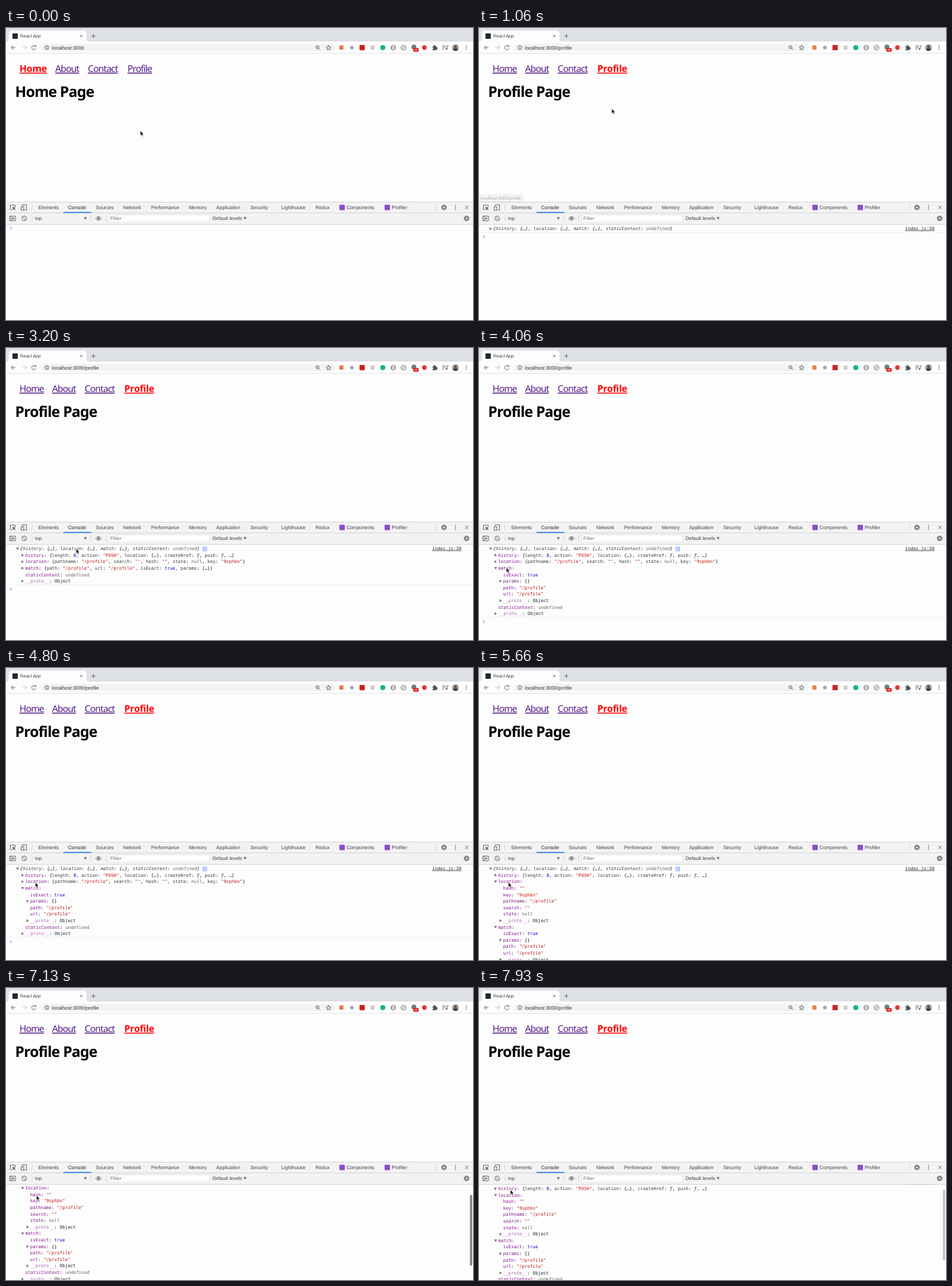
Animation of 692x432 px, one loop 8000 ms. Source, as an HTML page:

```html
<!DOCTYPE html>
<html lang="en">
<head>
<meta charset="utf-8">
<title>Router props in the console</title>
<style>
  html, body { margin: 0; width: 100%; height: 100%; overflow: hidden; background: #fdfdfd; }
  svg { display: block; width: 100vw; height: 100vh; }
  text { white-space: pre; text-rendering: geometricPrecision; fill: #3c4043; }
  .ui { font: 7.3px "Liberation Sans", Arial, sans-serif; }
  .tab { font: 6.6px "Liberation Sans", Arial, sans-serif; }
  .url { font: 7.4px "Liberation Sans", Arial, sans-serif; fill: #303134; }
  .tip { font: 6.4px "Liberation Sans", Arial, sans-serif; fill: #5f6368; }
  .mono { font: 6.6px "DejaVu Sans Mono", monospace; fill: #20242a; }
  .it { font-style: italic; }
  .link { font: 13.8px "Noto Sans", sans-serif; letter-spacing: -.8px; fill: #551a8b; text-decoration: underline; }
  .active { font-weight: 700; font-size: 14px; letter-spacing: -.22px; fill: #f00; }
  .head { font: 700 21.8px "Noto Sans", sans-serif; letter-spacing: -.75px; fill: #000; }
  .key { fill: #881391; } .proto { fill: #b061b8; } .sub { fill: #3c3c3c; }
  .str { fill: #c41a16; } .num { fill: #1c00cf; } .nil { fill: #666; }
  .icon { fill: none; stroke: #5f6368; stroke-width: .9; }
</style>
</head>
<body>
<svg viewBox="0 0 692 432" preserveAspectRatio="none">
  <rect width="692" height="432" fill="#fdfdfd"/>
  <g id="console"></g>
  <rect id="thumb" x="687.5" width="3.2" height="105" rx="1.6" fill="#555"/>
  <g id="frame"></g>
  <g id="page"></g>
  <g id="status">
    <path d="M0 247H63.500Q65.500 247 65.500 249V257H0Z" fill="#eef0f1" stroke="#ccc" stroke-width=".7"/>
    <text class="tip" x="2" y="254.200">localhost:3000/profile</text>
  </g>
  <path id="mouse" d="M0 0V7.200L1.700 5.700L2.900 8.500L4.200 7.900L3 5.200H5.200Z" fill="#000" stroke="#fff" stroke-width=".6"/>
</svg>
<script>
const LOOP = 8000, NAVIGATE = 930, EXPAND = 2660, OPEN_MATCH = 4060, OPEN_LOCATION = 4930;
const ROW = 9.6, FIRST_ROW = 297;
const $ = id => document.getElementById(id);

const text = (x, y, str, cls = 'ui', more = '') => `<text x="${x}" y="${y}" class="${cls}" ${more}>${str}</text>`;
const rect = (x, y, w, h, fill, more = '') => `<rect x="${x}" y="${y}" width="${w}" height="${h}" fill="${fill}" ${more}/>`;
const dot = (x, y, r, fill, more = '') => `<circle cx="${x}" cy="${y}" r="${r}" fill="${fill}" ${more}/>`;
const line = (d, more = '') => `<path class="icon" d="${d}" ${more}/>`;
const ring = (x, y, r) => `<circle class="icon" cx="${x}" cy="${y}" r="${r}"/>`;
const dots = (x, y) => [-2.6, 0, 2.6].map(d => dot(x, y + d, .8, '#5f6368')).join('');
const divider = (x, y) => rect(x, y, .7, 9, '#ccc');
const down = (x, y) => `<path d="M${x} ${y}h4.600l-2.300 4z" fill="#6e6e6e"/>`;
const gear = (x, y) => `<circle cx="${x}" cy="${y}" r="3.5" fill="none" stroke="#6e6e6e" stroke-width="1.5" stroke-dasharray="1.6 1.15"/>`
  + `<circle cx="${x}" cy="${y}" r="2.3" fill="none" stroke="#6e6e6e" stroke-width="1.5"/>`;

function browserBar() {
  return rect(0, 0, 692, 20, '#dee1e6')
    + '<path d="M0 20Q4.500 20 4.500 15.500V8Q4.500 4 8.500 4H115Q119 4 119 8V15.500Q119 20 123 20Z" fill="#fdfdfd"/>'
    + rect(0, 20, 692, 17.5, '#fdfdfd') + rect(0, 37.3, 692, .7, '#dadce0')
    + rect(9.5, 8, 8, 8, '#20282c', 'rx="1"') + text(21, 14.4, 'React App', 'tab')
    + line('M109.800 10.300l3.400 3.400m0-3.400l-3.400 3.400') + line('M126.500 12h6m-3-3v6')
    + line('M14 29H7.800m3-3l-3 3l3 3') + line('M24.500 29h6.200m-3-3l3 3l-3 3', 'opacity=".4"')
    + line('M43.800 27A3.200 3.200 0 1 0 44.400 30M44.300 25.500v2.200h-2.300')
    + rect(51, 23.3, 437, 11.2, '#f1f3f4', 'rx="5.6"')
    + ring(60.5, 29, 2.9) + line('M60.500 28.500v2.100m0-3.600v.8')
    + ring(461.5, 28.4, 2.3) + line('M463.200 30.200l2.500 2.300M460.400 28.400h2.200')
    + line('M478 25.500l1 2.400l2.500.2l-1.900 1.700l.6 2.500l-2.200-1.300l-2.200 1.300l.6-2.500l-1.900-1.700l2.500-.2z')
    + rect(494, 25.8, 6, 6.2, '#ef7b4d') + dot(512.5, 29, 2.7, '#a3a5a8')
    + rect(523.8, 25.2, 7.8, 7.6, '#c8201f') + rect(540.5, 26, 5.4, 6, '#c9cbcc')
    + dot(558.3, 29, 3.8, '#15b77d') + ring(573.7, 29, 3.5)
    + line('M573 27.200q-1 0-1 1.800q0 1.800 1 1.800m1.500-3.600q1 0 1 1.800q0 1.800-1 1.800', 'stroke-width=".6"')
    + ring(589, 29, 3.5) + line('M587.300 29l1.300 1.300l2.200-2.600')
    + dot(604.5, 28.2, 3.6, '#747b80') + rect(603.5, 29.7, 8, 5.3, '#d9201f', 'rx=".8"')
    + line('M605.500 32.400h4', 'style="stroke:#fff"') + dot(620, 29, 3.4, '#e23434')
    + '<path d="M632 27h2q-.4-2 1-2t1 2h2.200v2q1.600-.4 1.600 1t-1.600 1v1.700h-6.200v-2q1.500.2 1.500-.9t-1.500-.9z" fill="#505458"/>'
    + line('M646.500 26.500h5m-5 2.400h5m-5 2.400h3m4.300-5v4.400m0-4.400h2') + dot(652.8, 31, 1.3, '#5f6368')
    + dot(666, 29, 5, '#a99b94') + dot(666, 27.6, 1.9, '#594a48')
    + '<path d="M662 32q1-2.500 4-2.500t4 2.500q-1.400 2-4 2t-4-2z" fill="#453f4c"/>'
    + dots(682, 29);
}

function devtoolsBar() {
  const tabs = { Elements: 48, Console: 92, Sources: 133, Network: 173.7, Performance: 215, Memory: 271,
    Application: 311.5, Security: 362, Lighthouse: 408, Redux: 458.5, Components: 504.5, Profiler: 571.5 };
  return rect(0, 257, 692, 33.5, '#f3f3f3')
    + [257, 273.4, 290].map(y => rect(0, y, 692, .7, '#cbcbcb')).join('')
    + Object.entries(tabs).map(([name, x]) => text(x, 268.1, name, 'ui', name === 'Console' ? 'style="fill:#202124"' : '')).join('')
    + rect(85, 272.2, 41.5, 1.4, '#1a73e8')
    + rect(494, 261.6, 8, 8, '#8c4fc7', 'rx="1"') + rect(561, 261.6, 8, 8, '#8c4fc7', 'rx="1"')
    + line('M13.500 265v-3h-7v6.500h3') + '<path d="M9.500 264.300l5 2l-2 .8l1.600 2l-.9.700l-1.600-2l-1 1.600z" fill="#5f6368"/>'
    + line('M24 264v-2.400h6.400v8h-2.600M22.500 264.500h4v5.200h-4z')
    + divider(38, 261) + divider(637.5, 261) + gear(649, 265.5) + dots(666, 265.5)
    + line('M680.300 263l5 5m0-5l-5 5')
    + line('M5.500 278.300h8.500v6.800h-8.500zM7.700 278.300v6.800') + '<path d="M9.500 279.800v4l3-2z" fill="#5f6368"/>'
    + ring(27, 281.7, 3.5) + line('M24.600 279.300l4.800 4.800')
    + divider(38.5, 277) + text(43, 284.3, 'top') + down(115.3, 279.7) + divider(125.5, 277)
    + line('M132.800 281.700q4.300-5.400 8.600 0q-4.300 5.400-8.600 0z') + dot(137.1, 281.7, 1.6, '#5f6368')
    + divider(147.5, 277)
    + rect(152, 276.2, 149.5, 11.4, '#fdfdfd', 'stroke="#dcdcdc" stroke-width=".6"')
    + text(154.7, 284.3, 'Filter', 'ui', 'style="fill:#757575"')
    + text(306, 284.3, 'Default levels') + down(352, 279.7) + gear(682.5, 281.7);
}

function pageView(onProfile) {
  const names = ['Home', 'About', 'Contact', 'Profile'], shift = onProfile ? -4.7 : 0;
  const current = onProfile ? 'Profile' : 'Home';
  return names.map((name, i) => text([20, 73, 121.3, 180][i] + (i && shift), 65, name, 'link' + (name === current ? ' active' : ''))).join('')
    + text(13.5, 101.5, current + ' Page', 'head')
    + text(68, 31.5, 'localhost:3000' + (onProfile ? '/profile' : ''), 'url');
}

// Console rows are [level, arrow, text]; arrow is '>' closed, 'v' open or empty.
function consoleRows(t) {
  if (t < NAVIGATE) return [];
  const top = [0, t < EXPAND ? '>' : 'v', '{history: {…}, location: {…}, match: {…}, staticContext: undefined}'];
  if (t < EXPAND) return [top];
  const proto = level => [level, '>', '__proto__: Object'];
  const location = t < OPEN_LOCATION
    ? [[1, '>', 'location: {pathname: "/profile", search: "", hash: "", state: null, key: "9sphbn"}']]
    : [[1, 'v', 'location:'], [2, '', 'hash: ""'], [2, '', 'key: "9sphbn"'], [2, '', 'pathname: "/profile"'],
       [2, '', 'search: ""'], [2, '', 'state: null'], proto(2)];
  const match = t < OPEN_MATCH
    ? [[1, '>', 'match: {path: "/profile", url: "/profile", isExact: true, params: {…}}']]
    : [[1, 'v', 'match:'], [2, '', 'isExact: true'], [2, '>', 'params: {}'], [2, '', 'path: "/profile"'],
       [2, '', 'url: "/profile"'], proto(2)];
  return [top, [1, '>', 'history: {length: 8, action: "PUSH", location: {…}, createHref: ƒ, push: ƒ, …}'],
    ...location, ...match, [1, '', 'staticContext: undefined'], proto(1)];
}

function highlight(str, level) {
  return str.replace(/"[^"]*"|\w+(?=:)|\b\d+\b|\b(?:true|null|undefined)\b|ƒ/g, (word, at) => {
    const cls = word[0] === '"' ? 'str'
      : word === 'ƒ' ? 'it'
      : /^(null|undefined)$/.test(word) ? 'nil'
      : /^(\d+|true)$/.test(word) ? 'num'
      : word === '__proto__' ? 'proto'
      : level && at === 0 ? 'key' : 'sub';
    return `<tspan class="${cls}">${word}</tspan>`;
  });
}

function consoleView(rows) {
  let out = rows.map(([level, arrow, str], i) => {
    const y = FIRST_ROW + i * ROW, x = 21 + level * 7.4;
    const shape = { '>': `M${x - 5.3} ${y - 2.3}v4.400l3.300-2.200z`, v: `M${x - 6} ${y - 1.6}h4.400l-2.200 3.400z` }[arrow];
    return (shape ? `<path d="${shape}" fill="#6e6e6e"/>` : '')
      + text(x, y + 2.2, highlight(str, level), level ? 'mono' : 'mono it');
  }).join('');
  const last = FIRST_ROW + (rows.length - 1) * ROW;
  if (rows.length) {
    out += text(675, 298.6, 'index.js:20', 'mono', 'text-anchor="end" text-decoration="underline"')
      + rect(0, last + 5.3, 692, .7, '#ececec');
  }
  if (rows.length > 1) {
    out += rect(291.3, 293.9, 6.6, 6.8, '#a9c5f3', 'rx="1"')
      + line('M294.600 296.800v2.700m0-4.300v.8', 'style="stroke:#fff"');
  }
  const prompt = rows.length ? last + 12 : 296;
  return out + line(`M6 ${prompt - 2}l2.200 2l-2.200 2`, 'style="stroke:#367cf1"');
}

// Eased interpolation over keys [time, ...values].
function track(keys, t) {
  const next = keys.findIndex(k => k[0] > t);
  if (next < 0) return keys[keys.length - 1].slice(1);
  if (next === 0) return keys[0].slice(1);
  const a = keys[next - 1], b = keys[next], u = (t - a[0]) / (b[0] - a[0]), e = u * u * (3 - 2 * u);
  return a.slice(1).map((v, i) => v + (b[i + 1] - v) * e);
}

const mousePath = [[60, 199, 152], [750, 199, 62], [930, 199, 62], [1080, 196.500, 122], [1730, 196.500, 122],
  [2460, 104, 297], [3200, 104, 297], [3900, 40.500, 325], [4500, 40.500, 325], [4830, 43.500, 317],
  [6600, 43.500, 317], [7600, 46.500, 298.500]];
const scrollPath = [[6330, 0], [6530, 20.3], [7100, 20.3], [7500, 9.7]];
const thumbFade = [[6330, 0], [6430, .75], [7700, .75], [8000, .3]];
const statusFade = [[NAVIGATE, 1], [1200, 0]];

let shown = '';
function render(t) {
  const stage = [NAVIGATE, EXPAND, OPEN_MATCH, OPEN_LOCATION].filter(at => t >= at).length;
  if (shown !== stage) {
    shown = stage;
    $('page').innerHTML = pageView(stage > 0);
    $('console').innerHTML = consoleView(consoleRows(t));
  }
  const [scroll] = track(scrollPath, t);
  $('console').setAttribute('transform', `translate(0 ${-scroll})`);
  $('thumb').setAttribute('y', 291 + scroll * .74);
  $('thumb').setAttribute('opacity', track(thumbFade, t)[0]);
  $('status').setAttribute('opacity', t < NAVIGATE ? 0 : track(statusFade, t)[0]);
  $('mouse').setAttribute('transform', `translate(${track(mousePath, t)})`);
}

$('frame').innerHTML = browserBar() + devtoolsBar();
const start = performance.now();
function tick() {
  render((performance.now() - start) % LOOP);
  requestAnimationFrame(tick);
}
tick();
</script>
</body>
</html>
```
